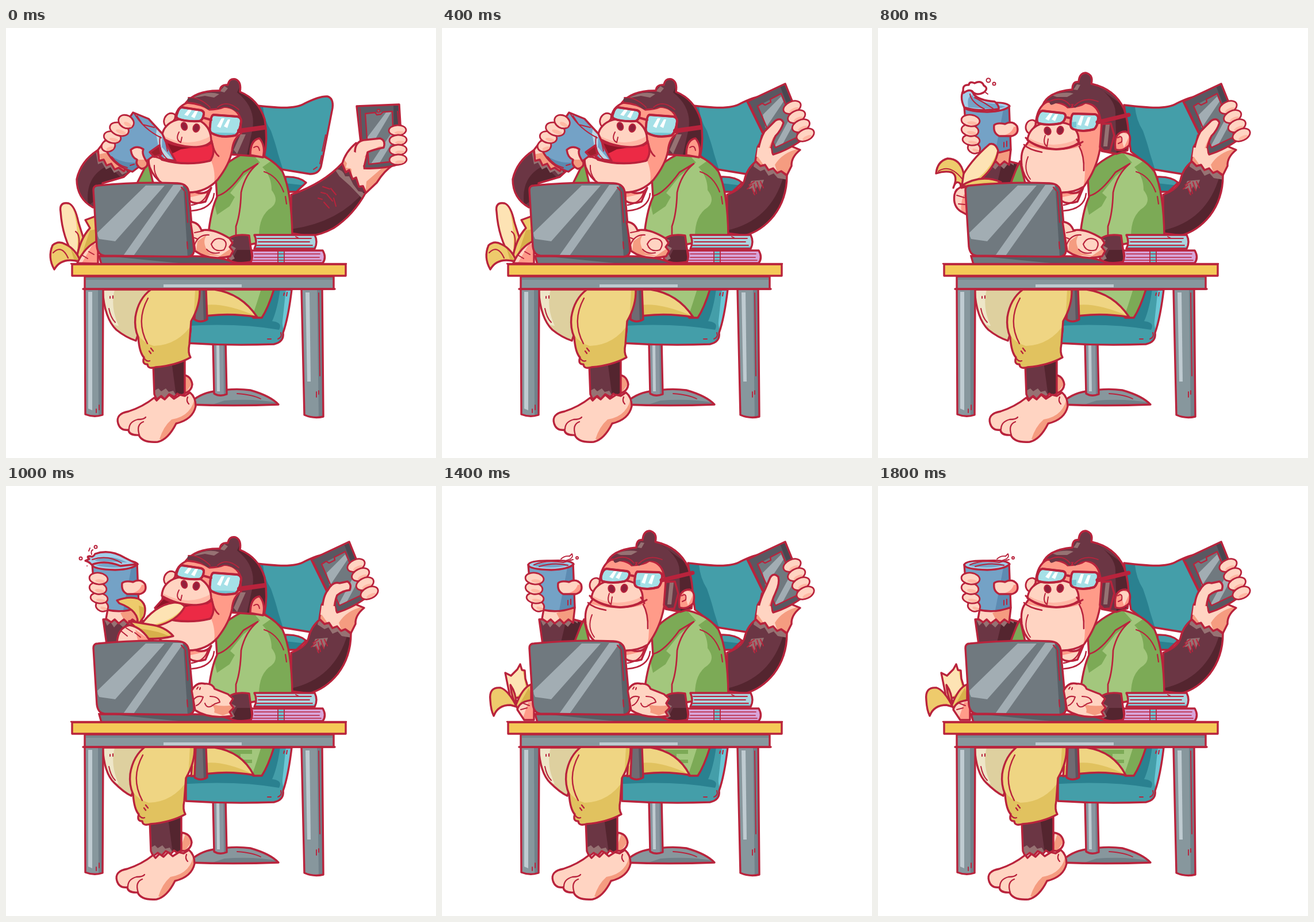
These frames come from a looping animation (748x748 px, 2 s). An HTML page with a canvas:

```html
<!DOCTYPE html>
<html lang="en">
<head>
<meta charset="utf-8">
<style>
html,body{margin:0;width:100%;height:100%;overflow:hidden;background:#fff}
canvas{display:block;width:748px;height:748px}
</style>
</head>
<body>
<canvas id="stage" width="748" height="748"></canvas>
<script>
const ctx = document.getElementById('stage').getContext('2d');
const INK = '#b9233c', SKIN = '#ffd4c2', BLUSH = '#ff9b89', TAN = '#f59c80',
  BROWN = '#6b3644', DARK = '#54252f', FUR = '#967273',
  TEAL = '#449ea9', DEEP = '#2a8190', SKY = '#6cc7d6',
  GREEN = '#a3c77d', LEAF = '#7caa56', CREAM = '#fde3b4', PEEL = '#eecb6c',
  STEEL = '#87979d', SHINE = '#bfcbd1', SLATE = '#70797f', GLARE = '#a2adb3',
  CUP = '#74a2c6', WATER = '#a3cfea', GLASS = '#a5e0e7', SHORTS = '#efd583', GOLD = '#e1c25f';

function fill(color, d) {
  ctx.fillStyle = color;
  ctx.fill(new Path2D(d));
}
function line(d, width = 2.4, color = INK) {
  ctx.strokeStyle = color;
  ctx.lineWidth = width;
  ctx.stroke(new Path2D(d));
}
// Filled shape with shading clipped inside it, then its outline.
function part(d, color, ...shades) {
  fill(color, d);
  ctx.save();
  ctx.clip(new Path2D(d));
  for (const [tone, path] of shades) fill(tone, path);
  ctx.restore();
  line(d, 3.4);
}
function oval(x, y, rx, ry, turn = 0, color = SKIN, width = 2.8) {
  ctx.beginPath();
  ctx.ellipse(x, y, rx, ry, turn, 0, Math.PI * 2);
  ctx.fillStyle = color;
  ctx.fill();
  if (width) {
    ctx.strokeStyle = INK;
    ctx.lineWidth = width;
    ctx.stroke();
  }
}
function finger(x, y, rx, ry, turn) {
  oval(x, y, rx, ry, turn);
  oval(x + 3, y + ry * .45, rx * .55, ry * .3, turn, '#ffb9a4', 0);
}
function shifted(dx, dy, draw) {
  ctx.save();
  ctx.translate(dx, dy);
  draw();
  ctx.restore();
}

function chairBack() {
  part('M486 259Q510 258 522 269L505 285H486Z', TEAL, [DEEP, 'M486 270L522 274V290H486Z']);
  part('M428 134C470 139 502 142 520 131Q546 118 559 119Q570 122 568 139L560 180L548 241Q544 254 529 254L480 246L440 215Z', TEAL,
    [DEEP, 'M425 130L447 137Q449 160 461 179Q470 205 473 218L483 250L430 220Z']);
  line('M556 186L550 214M549 222L546 236M541 242L535 246', 2);
}

function chairBase() {
  part('M317 655Q335 636 362 632Q397 626 425 630Q460 640 474 655Q395 658 317 655Z', STEEL,
    ['#707f87', 'M380 648Q430 644 474 652V665H330Z']);
  line('M402 636Q430 638 443 645', 1.8);
  part('M360 545H382L384 637Q372 642 362 636Z', '#8996a0', [SHINE, 'M366 550H371L372 632H367Z'], ['#75838d', 'M378 550H386V640H379Z']);
}

function seat() {
  part('M458 455H497Q491 505 482 530Q484 546 466 550Q390 553 313 548V505Q380 492 440 503Q455 487 458 455Z', TEAL,
    [DEEP, 'M300 502Q380 492 445 499Q462 480 463 454H477Q472 490 463 510Q482 512 475 525Q400 512 300 519Z'],
    [SKY, 'M487 454H499Q494 500 484 525Q480 520 481 510Z']);
  line('M484 461L483 465M489 460L488 466M478 530Q481 538 473 541M455 541H461', 2);
}

function legs(tucked) {
  const dx = tucked ? -9 : 0;
  part(tucked ? 'M168 455Q171 500 188 516Q205 533 218 539L247 455Z' : 'M168 455Q171 505 192 525Q208 538 226 544L255 455Z', '#ded09f',
    ['#eee6c8', 'M168 455H189Q181 486 196 518L175 515Z']);
  line('M179 488Q182 504 190 512M181 467V470M186 466V470', 2);
  part('M368 455H466Q456 487 445 504H430Q410 468 368 455Z', GREEN, [LEAF, 'M444 454H470L448 510L428 503Q436 480 444 454Z']);
  if (tucked) fill(LEAF, 'M388 459H428V466H408V476H428V482H412L398 469Z');
  const tail = tucked ? 431 : 437;
  part(`M326 455H363Q410 462 ${tail} 503Q380 493 322 505Z`, SHORTS,
    [GOLD, `M320 490Q360 468 ${tail} 502L320 512Z`]);
  part('M330 455H348L350 507Q338 514 328 507Z', '#706b72', ['#5b5660', 'M342 455H352V512H344Z']);
  shifted(tucked ? -1 : 0, 0, () => {
    part('M307 603Q322 605 324 620Q323 631 312 635L300 634Z', SKIN, [TAN, 'M313 606L325 617L310 638L305 628Z']);
  });
  shifted(tucked ? -6 : 0, tucked ? -2 : 0, () => {
    part('M256 584L258 637L262 646L270 640L276 646L284 637L293 642L298 636L304 640L311 636V574Z', BROWN,
      [DARK, 'M288 580H315V640H296Z'], [FUR, 'M256 632L265 627L270 632L278 627L283 633L291 631L295 638L286 646L258 650Z']);
  });
  shifted(tucked ? -2 : 0, tucked ? -1 : 0, () => {
    part('M258 643Q238 659 213 667Q190 671 195 688Q199 701 213 699Q214 709 231 708Q237 722 264 720Q282 716 296 688Q325 681 330 658Q330 642 320 634L311 640L303 638L292 645L284 638L276 646L269 641L262 648Z', SKIN,
      [TAN, 'M329 638Q325 675 288 681Q274 693 267 715L285 720L306 691L340 660Z']);
    line('M214 698Q214 685 229 681Q240 681 243 677M232 708Q226 690 239 685M316 642Q313 649 318 654', 2.3);
  });
  shifted(dx, tucked ? -2 : 0, () => {
    part('M252 455Q230 471 225 503Q223 522 230 538Q232 565 240 573Q236 585 246 585Q247 594 260 590Q296 587 321 573Q316 565 319 550L322 510Q338 483 337 455Z', SHORTS,
      [GOLD, 'M326 512Q300 552 257 553Q239 548 229 533L239 580L260 595L325 575L343 455H329Z']);
    line('M247 470Q225 510 246 549M236 566Q242 582 250 579M252 557L256 562M249 562L252 566M322 523L320 538', 2.4);
  });
}

function jacket() {
  fill('#fff', 'M318 292L370 270L362 360L320 385Z');
  part('M319 281Q345 295 357 278L347 302Q327 308 319 300Z', BLUSH, [SKIN, 'M318 295L348 288V310H318Z']);
  line('M323 308Q345 305 351 286M323 318Q359 315 362 288', 2.4);
  part('M247 232L228 270H256Z', LEAF);
  part('M365 262Q371 237 420 215Q461 222 481 250Q497 285 498 362L402 381L353 350Q358 313 367 294Z', GREEN,
    [LEAF, 'M360 250L420 210L442 234L413 258L390 287L398 294L389 310L367 325L360 295Z'],
    [LEAF, 'M446 242Q462 258 462 282Q476 300 462 312Q440 326 440 362H502V260L470 225Z']);
  line('M368 292Q387 287 413 251L438 236Q416 254 409 286Q408 323 400 345V371', 2.7);
  line('M449 250Q472 257 483 285M486 293L488 306', 2.2);
}

function phoneArm(out, thumb) {
  if (out) {
    part('M496 290Q553 270 585 235L591 251L597 247L603 262L609 258L614 274L621 275L626 286Q604 326 570 348Q548 360 527 362L496 357Z', BROWN,
      [DARK, 'M496 350Q580 338 625 282L610 328L530 370H496Z'],
      [FUR, 'M572 246Q585 244 590 258L597 258L604 272L613 284L619 285L626 290L620 297L599 275L580 258Z']);
    line('M551 276L563 280M548 286L556 288M543 296L550 298M565 279L574 290M558 289L568 301M570 296L574 310M553 303L562 313', 2);
    part('M585 236Q590 216 609 200L660 216L674 238Q658 248 645 269L626 287L621 275L614 276L609 260L603 263L597 247L591 251Z', SKIN,
      [TAN, 'M670 230L627 267L625 290L680 250ZM589 230L601 246L602 263L583 249Z']);
    part('M610 136L684 133L690 235Q658 246 622 244Z', '#5b5a63', ['#494750', 'M674 132H685L691 240L676 241Z']);
    line('M616 141L621 235M690 236L681 145', 1.8);
    fill(SLATE, 'M625 149L672 145L675 232L631 237Z');
    fill(GLARE, 'M625 195L661 147L671 145L630 214ZM635 236L674 177V195L649 236Z');
    line('M625 149L642 147L645 151L652 150L656 146L672 145L675 232L631 237Z', 2.3);
    oval(648, 144, 2.5, 2.5, 0, SLATE, 1.8);
    for (let i = 0; i < 4; i++) finger([681, 682, 682, 682][i], 178 + i * 17, 15, 9, -.05);
    part('M607 219Q606 198 622 195L651 192Q661 196 657 208Q641 211 629 216L623 241Q609 240 607 219Z', SKIN,
      [BLUSH, 'M645 208Q652 203 659 208L628 218L622 226Z']);
    fill(SKIN, 'M599 213L619 221L622 247L591 243Z');
    return;
  }
  part('M496 290Q522 280 526 265Q530 245 546 232L554 240L562 238L568 247L576 244L583 252L590 249L600 257Q600 297 577 327Q556 353 527 361L496 357Z', BROWN,
    [DARK, 'M496 352Q572 335 594 258L601 261L582 332L530 369H496Z'],
    [FUR, 'M542 241L554 249L561 246L568 257L577 253L584 261L601 264V246L545 227Z'],
    [FUR, 'M538 266L560 264L553 283L548 275L542 290L540 279L533 280Z']);
  line('M534 273L543 267M531 280L539 273M543 272L547 288M548 268L553 283M554 267L559 278M539 279L544 290', 2);
  part('M545 231L549 207L563 184L606 205L623 212Q607 225 608 240L600 256L590 249L583 252L576 244L568 247L562 238L554 240Z', SKIN,
    [TAN, 'M624 209Q592 216 579 238L585 256L611 255L628 215ZM548 222L560 239L544 240Z']);
  part('M531 128L597 97L634 189Q604 212 576 220Z', '#595861', ['#494750', 'M588 101L599 96L637 190L626 199Z']);
  line('M535 132L575 214', 1.8);
  fill(SLATE, 'M549 136L591 114L620 189L580 208Z');
  fill(GLARE, 'M558 151L590 119L594 128L563 174ZM578 207L606 155L611 168L592 203Z');
  line('M549 136L557 131L562 134L572 129L571 124L590 114L620 189L580 208Z', 2.4);
  for (let i = 0; i < 4; i++) finger(609 + i * 7.7, 138 + i * 16, 16, 10, -.43);
  const thumbs = [
    'M550 214Q552 190 560 181Q569 165 580 169L594 166Q602 171 598 181Q586 182 576 190Q571 202 572 214Z',
    'M550 214Q553 194 561 180L580 161Q590 155 594 165Q590 178 580 188Q573 202 572 214Z',
    'M550 214Q554 195 562 180L571 159Q577 150 585 158Q588 169 580 186Q573 201 572 214Z'
  ];
  part(thumbs[thumb], SKIN, [BLUSH, 'M597 179L576 190L565 217H574L581 191Z']);
  fill(SKIN, 'M549 208L572 209L574 224L547 224Z');
}

function lenses(left, right, shine) {
  for (const d of [left, right]) part(d, GLASS, ['#fff', shine], ['#75c4d2', 'M270 170L345 163V173H270ZM332 181L410 183V194H332Z']);
  line(left + right, 4);
}

function headUp() {
  oval(286, 161, 11, 13, .4);
  part('M312 131Q330 108 372 109Q373 98 386 99Q388 87 399 89Q410 93 407 111Q439 124 450 159Q456 194 449 224L420 222L392 220L340 153Z', BROWN,
    [DARK, 'M402 112Q437 140 428 180L418 225H460V150L410 95Z'], [FUR, 'M372 110L380 101L386 105L380 112ZM324 122Q350 108 371 115L362 121L346 118Z']);
  part('M425 221Q425 194 441 192Q452 205 447 225Z', BLUSH);
  line('M431 208Q439 202 441 213', 2);
  part('M294 158Q296 137 316 130Q340 132 354 142Q369 142 380 137Q400 138 407 155L409 184Q395 192 393 214Q389 237 368 264Q347 287 314 286Q263 277 250 242Q244 222 258 221L272 200Q271 184 282 174Z', BLUSH,
    [SKIN, 'M244 218L357 231Q368 258 358 286H303L247 255Z']);
  fill(FUR, 'M408 185L417 185L402 219L396 212Z');
  part('M274 195Q300 211 350 204L358 199Q365 218 355 231Q312 241 271 229L259 212Z', '#ec2a45',
    ['#8e1426', 'M272 195Q305 211 338 206L304 211Q284 222 268 225L256 210Z']);
  line('M358 196Q361 216 370 223M247 226Q258 221 272 229Q318 241 357 230', 2.8);
  line('M258 239Q257 253 266 264', 2);
  part('M271 191Q272 171 291 162Q316 152 340 163Q357 174 357 197Q349 207 326 207Q296 206 271 191Z', SKIN,
    ['#ffb7a5', 'M273 187Q318 211 358 187V208L276 204Z']);
  oval(310, 171, 5, 7, -.35, '#91213b', 2);
  oval(331, 174, 5.5, 7, .25, '#91213b', 2);
  line('M301 181Q294 194 304 199L306 190', 2);
  line('M319 125Q335 124 352 138M369 137Q383 128 402 142', 7, BROWN);
  line('M317 121Q337 120 355 138M368 138Q384 124 405 142', 1.8);
  lenses('M306 138L339 143Q345 145 344 150Q342 162 335 162Q312 163 300 158Q294 156 298 148Q301 138 306 138Z',
    'M361 151L402 154Q409 155 409 162Q407 181 399 187Q374 192 358 183Q353 180 355 171Q356 152 361 151Z',
    'M310 151L319 140H325L316 153ZM322 154L329 144H334L328 157ZM367 171L375 157H380L373 174ZM379 171L386 159H390L385 174Z');
  line('M343 156L357 160', 4);
  line('M406 179L449 173', 8);
}

function headDown() {
  oval(267, 172, 10, 12, .2);
  part('M286 135Q295 111 338 107Q338 92 349 94Q350 78 362 78Q375 82 371 97Q412 106 428 141Q440 177 434 213L415 219L389 214L340 134Z', BROWN,
    [DARK, 'M372 95Q415 122 413 150L415 220H441L433 140Z'], [FUR, 'M340 107L346 98L352 99L347 108ZM302 117Q326 110 340 114L329 120L311 120Z']);
  part('M413 211Q409 180 431 180Q442 184 437 204Q425 216 413 211Z', BLUSH, [SKIN, 'M419 180L438 186L428 208Z']);
  line('M417 191Q426 185 424 198L418 201', 2);
  part('M274 169Q276 137 295 128Q322 129 330 138Q350 138 361 130Q380 133 385 151L390 172L386 211Q380 246 358 276Q333 291 300 284Q256 278 250 240Q247 213 258 203L263 196Q265 181 274 169Z', BLUSH,
    [SKIN, 'M245 200Q302 222 352 206Q365 240 357 278Q332 292 301 284Q258 277 247 239Z']);
  line('M254 203Q263 212 285 216M350 206Q359 222 358 248', 2.6);
  line('M261 224Q252 246 265 263', 2);
  part('M389 167L405 166L411 187L404 213L393 214L386 207Z', BROWN, [FUR, 'M396 168H403L399 206H392Z']);
  part('M260 195Q262 175 283 167Q310 159 333 168Q351 178 349 200Q335 210 310 211Q280 209 260 195Z', SKIN,
    ['#ffb7a5', 'M260 190Q304 216 353 190L348 214L263 209Z']);
  line('M257 191Q275 211 310 211Q336 211 356 198M346 194Q350 198 352 204', 3.2);
  oval(295, 179, 5.5, 7, -.35, '#91213b', 2);
  oval(317, 178, 5.5, 7, .25, '#91213b', 2);
  line('M291 187Q286 201 294 206L296 193', 2);
  line('M302 130Q321 121 333 135M343 135Q360 120 381 132', 7, BROWN);
  line('M300 127Q321 118 334 134M342 135Q359 118 383 128', 1.8);
  lenses('M286 144L321 148Q327 149 326 155Q324 164 317 166Q296 170 280 166Q275 164 277 156Q280 145 286 144Z',
    'M340 149L377 150Q383 151 383 157Q382 171 376 176Q356 182 340 176Q334 174 335 166Q336 150 340 149Z',
    'M291 158L299 148H304L297 161ZM302 159L308 150H313L308 162ZM347 168L353 153H358L353 170ZM359 169L365 155H370L365 171Z');
  line('M326 155L336 157', 4);
  line('M382 164L436 151', 7);
}

function drinkingArm(pouring) {
  part('M159 213Q130 232 123 263Q123 296 151 312H168V270L205 259L217 248L162 223Z', BROWN,
    [DARK, 'M178 239Q136 258 143 309L204 264Z'],
    [FUR, 'M156 214L160 237L167 234L174 246L182 242L188 252L196 248L202 255L211 251L205 241L163 213Z']);
  part('M160 212L177 190L221 225L205 249L196 243L189 246L183 236L175 239L170 229L162 231Z', SKIN,
    [TAN, 'M160 220L184 215L211 243L203 252L167 231Z']);
  if (pouring) {
    part('M222 146Q255 160 270 210L267 224L215 251Q184 241 175 214Z', CUP,
      ['#5c89ae', 'M174 216Q208 246 258 227L220 254L179 232Z']);
    part('M223 147Q254 160 270 207L269 190Q265 171 223 147Z', WATER);
    line('M229 160Q247 171 250 185M237 159Q255 175 263 194', 2, '#d8eaf4');
    part('M269 190Q285 204 292 232Q279 231 272 228Z', WATER, [CUP, 'M277 203L283 231H276L271 220Z']);
    part('M257 217L268 210L272 227L259 224Z', '#9b1f2d');
  } else {
    part('M221 147L248 158L272 184Q283 211 295 231L274 228L262 218L220 250Q188 240 175 214Z', CUP,
      ['#5c89ae', 'M174 216Q208 246 258 227L220 254L179 232Z'], ['#b9d8e6', 'M263 171L272 185L271 207L292 231H278L265 205L261 184Z']);
    line('M222 147Q238 175 270 191M228 153L238 168L258 173M268 189Q264 215 282 229M278 200L281 214', 2);
    part('M250 216L267 204L270 220L258 224Z', '#9b1f2d');
  }
  line('M184 224Q195 239 211 243M231 230H239M216 239L223 237', 2);
  finger(178, 205, 12, 10, -.3);
  finger(185, 190, 15, 10, .25);
  finger(197, 176, 17, 11, .35);
  finger(209, 163, 14, 11, .5);
  part('M217 212Q227 203 239 211Q235 219 246 234Q247 243 236 245Q224 239 228 229Q219 226 217 212Z', SKIN,
    [TAN, 'M229 229L249 229L241 248L225 240Z']);
}

// splash: 'foam', 'surge', 'swirl' or 'ripple'
function holdingArm(splash) {
  part('M169 232L175 275H229L244 236L224 231Z', BROWN, [DARK, 'M217 229L206 276H230L247 235Z'],
    [FUR, 'M169 228L176 243L182 237L188 246L195 238L204 246L211 238L219 245L228 234L236 239V227Z']);
  part('M177 214L231 212L228 238L220 232L212 239L205 232L196 239L189 232L183 237L174 231Z', SKIN,
    [TAN, 'M219 213L199 221L210 242H235V212Z']);
  part('M150 137Q188 128 228 135L231 211Q203 222 174 215Q153 210 154 187Z', CUP,
    ['#5d8bb2', 'M219 137H231L233 215L203 221Z']);
  line('M219 199V207M224 197V206', 2);
  part('M150 137Q153 129 190 130Q224 128 229 136Q220 145 190 146Q151 145 150 137Z', WATER, [CUP, 'M156 138Q184 129 222 137Q192 146 156 138Z']);
  if (splash === 'foam') {
    part('M150 138Q141 119 150 106Q162 104 167 116Q176 126 203 128Q211 135 210 141Q176 146 150 138Z', WATER,
      [CUP, 'M157 138Q154 118 164 117Q172 130 206 132L210 142Z']);
    line('M160 115Q162 129 185 141M168 121Q184 129 200 140', 2);
    part('M149 113Q145 98 158 99Q159 92 168 96Q180 90 184 100Q193 105 184 112Q171 119 164 110Q158 106 149 113Z', '#fff');
    oval(192, 91, 3.5, 3.5, 0, '#fff', 2);
    oval(202, 97, 2.5, 2.5, 0, '#fff', 2);
    line('M187 112L191 115', 2);
  }
  if (splash === 'surge') {
    part('M149 137Q145 132 138 130L145 127Q139 122 146 122Q151 125 155 118Q180 109 207 125L229 136L199 139Q172 128 149 137Z', WATER, [CUP, 'M154 130Q177 116 211 133Z']);
    line('M150 128Q177 119 201 134M149 119Q147 113 151 111M144 113L146 108', 2);
    oval(130, 126, 2.5, 2.5, 0, '#fff', 2);
    oval(156, 106, 2.5, 2.5, 0, '#fff', 2);
    oval(141, 139, 1, 1, 0, INK, 0);
  }
  if (splash === 'swirl') {
    line('M160 137Q180 128 211 133L228 128M169 140Q196 132 219 138', 2);
    line('M207 127Q213 121 222 122L226 118Q229 123 223 127Q215 131 206 130', 1.8);
    oval(235, 125, 2, 2, 0, '#fff', 2);
  }
  if (splash === 'ripple') {
    part('M154 137Q151 126 162 121Q170 127 187 129L221 136Q186 130 154 137Z', WATER);
    line('M167 135Q190 130 211 140', 2);
  }
  finger(167, 209, 11, 9, .35);
  finger(162, 195, 15, 9, .15);
  finger(160, 178, 15, 10, .2);
  finger(161, 161, 16, 10, .12);
  part('M202 169Q207 164 221 167Q234 160 242 171Q246 184 233 188H211Q200 183 202 169Z', SKIN,
    [BLUSH, 'M236 172L245 171L235 192L211 188Q232 186 236 172Z']);
}

function bananaLow(bitten) {
  if (bitten) {
    part('M110 325L120 330L131 319L136 310L139 320L144 321L145 335L154 365L119 370Z', CREAM, [PEEL, 'M139 315L146 353L126 369L151 370V325Z']);
    part('M84 373Q81 349 102 351Q115 355 130 384L119 381Q97 381 90 400Q85 390 84 373Z', PEEL);
    part('M119 346Q129 360 129 380Q140 351 155 345V376L133 390Q121 370 119 346Z', PEEL, ['#d7b04b', 'M134 381L151 351L158 373Z']);
    part('M131 389Q134 374 160 372V407H143Z', SKIN, [BLUSH, 'M150 376H161V409H139Z']);
    line('M139 377L152 382M137 389L148 386', 2);
    return;
  }
  part('M95 320Q92 302 109 305Q120 309 126 338L137 373L120 400Q98 365 95 320Z', CREAM, [PEEL, 'M115 310Q128 345 123 400H139L126 340Z']);
  part('M138 334L157 327V381L122 405Q128 367 146 348Z', PEEL, ['#d7b04b', 'M146 352L131 397L157 378V350Z']);
  part('M84 420Q72 399 81 378Q91 369 103 376Q121 384 130 407Q97 397 84 420Z', PEEL, ['#d7b04b', 'M112 382L128 407L118 402Z']);
  line('M82 391Q97 376 108 400M121 354Q131 360 125 389', 2.2);
  part('M124 409Q137 380 160 370V410Z', SKIN, [BLUSH, 'M151 376H163V412H130Z']);
  line('M132 395L142 401M144 389L153 394', 2);
}

function bananaRaised(bitten) {
  part('M147 276Q135 279 133 290Q130 310 144 319L157 326V276Z', SKIN, [BLUSH, 'M149 290Q142 310 146 324L160 330V287Z']);
  line('M137 291L150 295M140 306L151 307', 2);
  part(bitten ? 'M142 266Q152 244 167 229L174 238L181 234L188 249Q171 271 145 278Z'
    : 'M142 266Q159 232 194 202Q204 199 209 213Q205 240 180 262Q163 276 145 278Z', CREAM,
    [PEEL, 'M159 271Q196 250 208 212L211 232L183 270Z']);
  part('M101 253Q103 232 121 227Q143 227 149 253L146 274Q136 261 131 278Q140 257 128 251Q116 248 101 253Z', PEEL);
  line('M105 249Q125 236 146 262', 2);
  part('M144 275Q179 253 214 268L195 276Z', PEEL, ['#d7b04b', 'M151 276Q187 265 211 270L188 280Z']);
}

function bananaMouth() {
  part('M232 245Q259 207 291 203Q305 202 311 210Q298 235 261 244Z', CREAM, [PEEL, 'M309 211Q288 237 246 243H278L313 218Z']);
  part('M229 243Q233 217 197 204L193 199Q214 191 230 196Q247 205 240 227Z', PEEL, ['#d7b04b', 'M231 208L241 212L234 243Z']);
  part('M214 235L250 241Q276 244 291 261Q274 266 246 266Z', PEEL, ['#d7b04b', 'M233 248Q265 252 286 262L249 268Z']);
  part('M193 272Q195 246 215 242Q237 246 252 272Z', SKIN, [BLUSH, 'M225 250L252 269L231 276Z']);
  line('M200 252L211 261M209 247L220 254M224 255L234 263', 2);
}

function laptop() {
  part('M162 397H325Q379 397 402 411H166Z', SLATE, ['#585b62', 'M178 397H326Q379 400 403 411H321Z']);
  part('M152 282Q152 274 160 274Q230 267 298 270Q317 271 318 287L327 386Q327 397 316 398L171 396Q160 395 158 380Z', SLATE,
    ['#596168', 'M308 268H321L330 399H316Z'],
    [GLARE, 'M243 274H276L190 371L162 367Q159 362 159 356ZM291 273H309L222 396H204Z']);
  line('M161 396L249 398L320 397M312 285L316 338M315 372L316 384M305 277L310 283', 2.2);
}

function typingHand(lifted) {
  part('M386 367Q400 357 423 361L429 406Q400 413 386 402Z', BROWN, [DARK, 'M402 386H430V410H390Z'],
    [FUR, 'M385 365L396 369L391 378L400 383L393 392L398 401L387 406Z']);
  if (lifted) {
    part('M323 356Q331 340 346 344Q359 343 363 353L386 362L395 370L390 378L396 386L389 393L393 400Q353 406 329 390Z', SKIN,
      [TAN, 'M356 379Q365 386 362 394L377 399L397 392L394 381Q375 385 356 379Z']);
    line('M326 373Q331 363 343 367Q339 379 331 382M355 366Q370 366 372 376L363 379Q350 390 346 378M332 353L334 350M337 354L338 351', 2.2);
  } else {
    part('M321 337Q335 338 340 352Q360 348 389 366L394 374L389 381L395 388L390 397Q355 406 329 388Z', SKIN,
      [TAN, 'M333 371L350 359Q339 373 353 391L376 397L330 394ZM389 385L397 384V402L370 398Z']);
    line('M328 356L343 353M328 377Q335 359 353 360M357 376Q364 362 378 368Q387 374 379 386Q362 391 357 376M349 385Q357 394 371 391M328 365L333 367', 2.2);
  }
}

function books() {
  part('M432 360H537Q543 372 537 384H432Q438 372 432 360Z', '#aad5df', ['#76b7c7', 'M432 380H540V386H432Z']);
  line('M437 366H531M439 372H528M434 378H533M504 363L510 366', 1.8);
  part('M427 387H551Q558 399 551 409H425Q431 398 427 387Z', '#d8a4d9', [SKY, 'M473 387H484V410H473Z']);
  line('M432 393H546M432 399H545M429 404H548M473 388V408M484 388V408', 1.7);
}

function desk() {
  part('M137 454H169L168 673Q153 678 138 672Z', STEEL, [SHINE, 'M143 459H150V665L143 662Z'], ['#71818a', 'M160 454H171V677H161Z']);
  part('M514 454H550L552 676Q535 680 519 673Z', STEEL, [SHINE, 'M521 460H528L530 615H524Z'], ['#71818a', 'M541 454H551L555 680H544Z']);
  line('M544 461L546 605M544 631V637M540 633V642M162 656V664M157 663V669', 1.9);
  part('M137 432H570V454H137Z', STEEL, [SHINE, 'M274 446H410V451H274Z'], ['#76868d', 'M139 433H569V438H139Z']);
  line('M134 454H572', 3.4);
  part('M115 411H591V431H115Z', '#f5c957');
  line('M113 410H592', 2.4);
}

const THUMBS = [1, 0, 1, 2];
const SPLASHES = ['foam', 'surge', 'ripple', 'swirl'];

function drawPose(pose) {
  const odd = pose % 2 === 1;
  const drinking = pose < 4;
  ctx.fillStyle = '#fff';
  ctx.fillRect(0, 0, 748, 748);
  ctx.lineCap = ctx.lineJoin = 'round';
  chairBack();
  chairBase();
  seat();
  legs(odd);
  phoneArm(pose === 0, THUMBS[pose % 4]);
  jacket();
  if (drinking || pose === 5) headUp(); else headDown();
  if (drinking) drinkingArm(odd);
  else holdingArm(SPLASHES[pose < 8 ? pose - 4 : pose - 6]);
  if (drinking || pose > 6) bananaLow(!drinking);
  else if (pose === 5) bananaMouth();
  else bananaRaised(pose === 6);
  laptop();
  typingHand(odd);
  books();
  desk();
}

let shown = -1;
function tick(now) {
  const pose = Math.floor(now % 2000 / 200);
  if (pose !== shown) drawPose(shown = pose);
  requestAnimationFrame(tick);
}
tick(performance.now());
</script>
</body>
</html>
```
